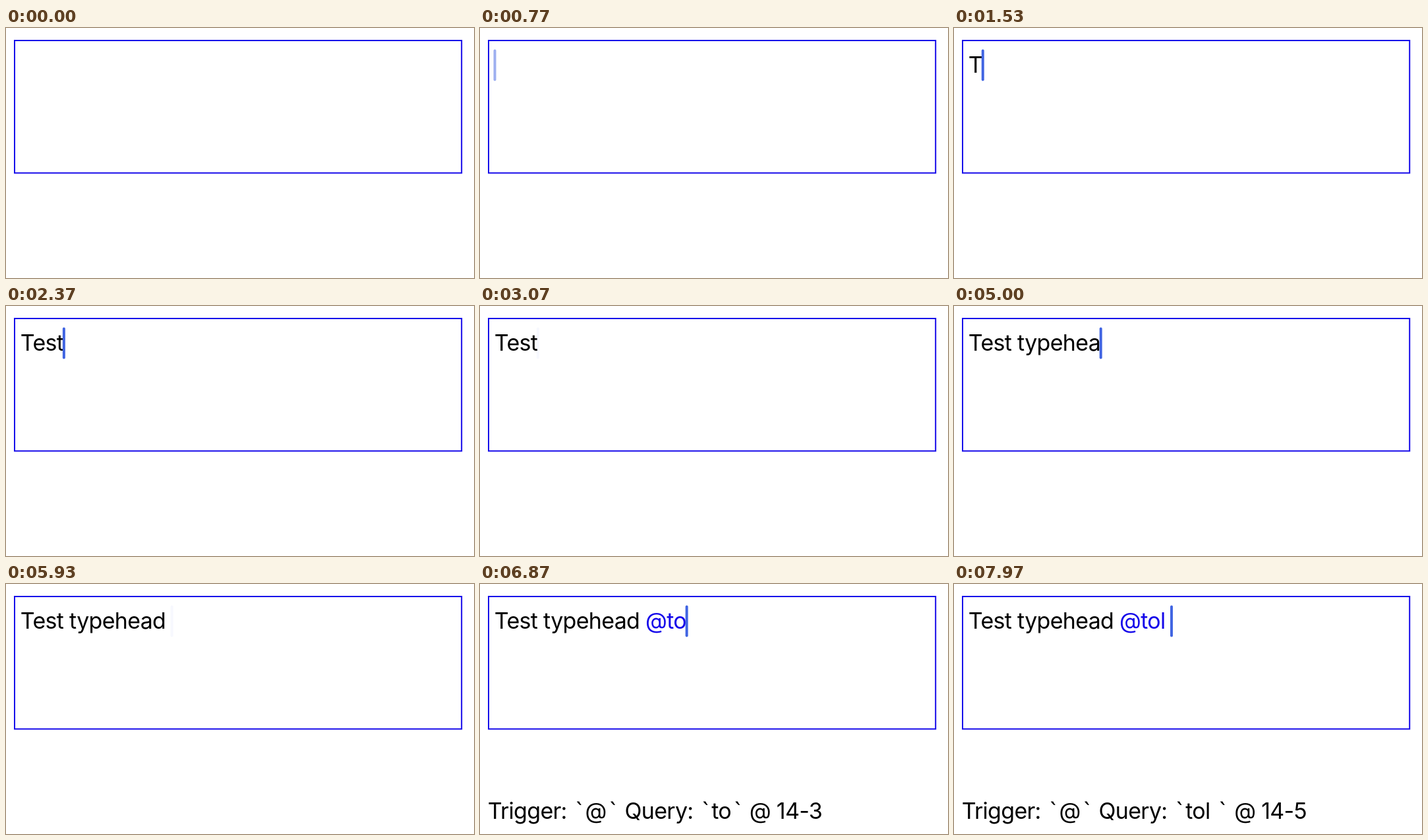
An HTML page for the animation above (8 s loop, 710 by 380 pixels).

```html
<!DOCTYPE html>
<html>
<head>
<meta charset="utf-8">
<style>
html, body { margin: 0; width: 100%; height: 100%; overflow: hidden; background: #fff; }
svg { display: block; }
text { font: 34px Inter, "Liberation Sans", sans-serif; letter-spacing: -0.7px; white-space: pre; }
.tick { font-family: "Open Sans", sans-serif; }
</style>
</head>
<body>
<svg width="710" height="380">
  <rect x="13" y="19" width="678.2" height="201.4" fill="none" stroke="#1508ea" stroke-width="2"/>
  <text id="field" x="21.8" y="68"><tspan id="plain"></tspan><tspan id="mention" fill="#1508ea"></tspan></text>
  <rect id="caret" y="32.5" width="4" height="48" rx="2" fill="#4165e2"/>
  <text id="status" x="11.8" y="357">Trigger: <tspan class="tick">`</tspan>@<tspan class="tick">`</tspan> Query: <tspan class="tick">`</tspan><tspan id="query"></tspan><tspan class="tick">`</tspan> @ <tspan id="range"></tspan></text>
</svg>
<script>
const $ = id => document.getElementById(id);
const LOOP = 8000, BLINK = 1000, FOCUS = -830, STATUS_LAG = 30;

// typing bursts: text, start time, time between keys
const bursts = [['Tes', 1530, 150], ['t ', 2370, 800], ['ty', 3670, 60], ['pe', 4100, 230],
  ['head ', 4670, 140], ['@tol', 6100, 340], [' ', 7830, 0]];
const keys = bursts.flatMap(([text, start, gap]) =>
  [...text].map((char, i) => ({ char, time: start + i * gap })));
const message = keys.map(k => k.char).join('');
const mentionAt = message.indexOf('@');

const typedAt = t => keys.filter(k => k.time <= t).length;
const clamp = v => Math.max(0, Math.min(1, v));

// each key restarts the blink: solid, fade out, pause, fade in
function caretOpacity(t, lastKey) {
  const age = t - lastKey, phase = age % BLINK;
  const fadeIn = age < BLINK ? 1 : clamp((phase + 30) / 230);
  return Math.min(fadeIn, clamp((710 - phase) / 210));
}

function draw(t) {
  const typed = typedAt(t);
  const text = message.slice(0, typed);
  $('plain').textContent = text.slice(0, mentionAt);
  $('mention').textContent = text.slice(mentionAt);
  $('caret').setAttribute('x', 20.5 + (typed ? $('field').getComputedTextLength() : 0));
  $('caret').setAttribute('opacity', caretOpacity(t, typed ? keys[typed - 1].time : FOCUS));

  const count = typedAt(t - STATUS_LAG) - mentionAt;
  $('status').setAttribute('visibility', count > 0 ? 'visible' : 'hidden');
  $('query').textContent = message.slice(mentionAt + 1, mentionAt + Math.max(1, count));
  $('range').textContent = `${mentionAt}-${count}`;
}

const begin = performance.now();
function tick() {
  draw((performance.now() - begin) % LOOP);
  requestAnimationFrame(tick);
}
tick();
</script>
</body>
</html>
```
